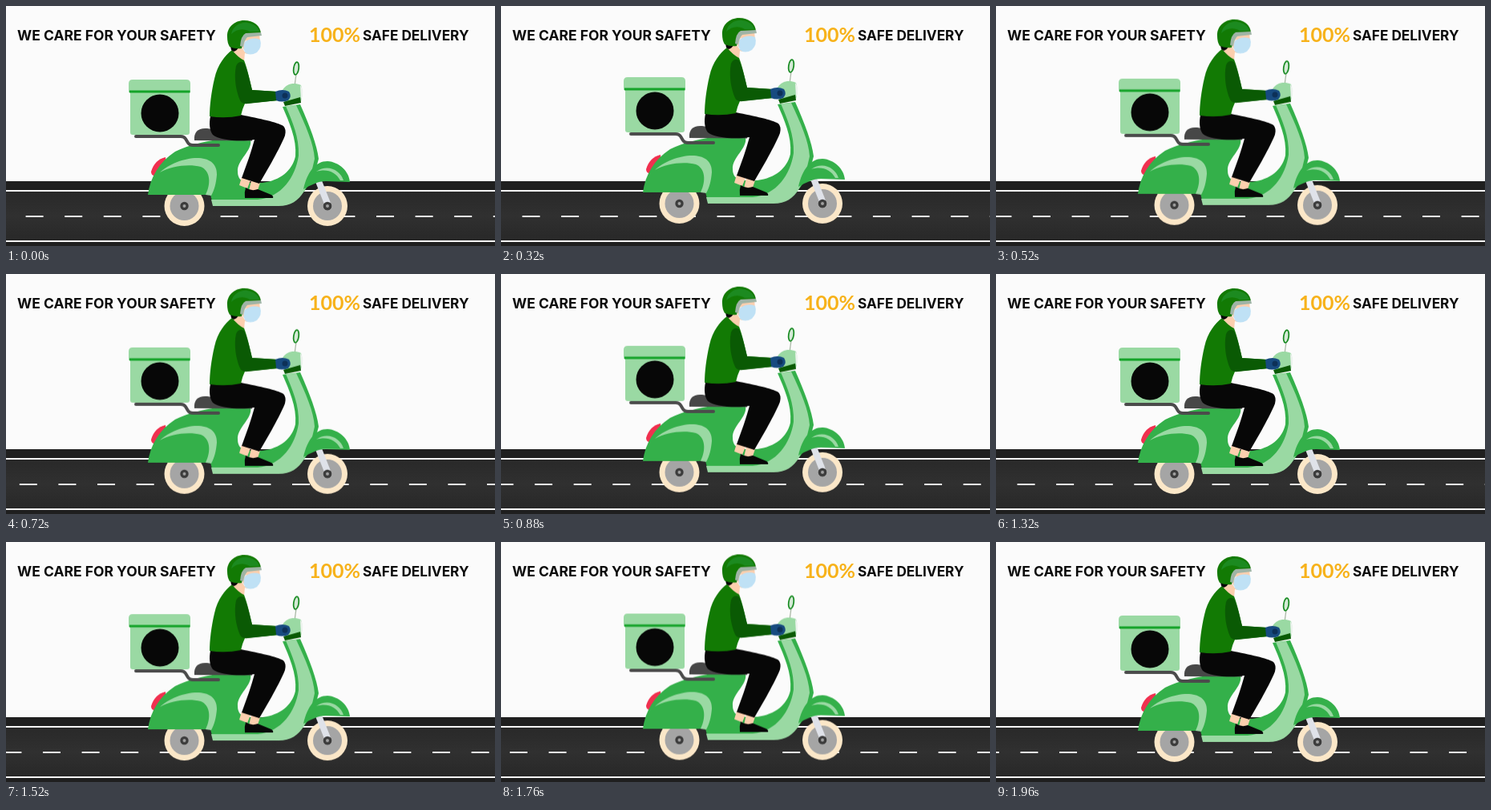
Animation of 610 by 300 pixels, one loop 2 s. Source, as an HTML page:

```html
<!DOCTYPE html>
<html lang="en">
<head>
<meta charset="utf-8">
<title>Safe delivery</title>
<style>
  html, body { margin: 0; width: 100%; height: 100%; overflow: hidden; background: #fbfbfb; }
  svg { display: block; width: 610px; height: 300px; }

  .slogan { font: 700 17.5px Inter, "Open Sans", sans-serif; fill: #0b0b0b; }
  .promise { font-size: 17.2px; }
  .percent { font: 700 25px Lato, sans-serif; fill: #f7b21a; }

  .green { fill: #34b04a; }
  .pale { fill: #9ad9a3; }
  .leaf { fill: #127a04; }
  .deep { fill: #0a5a04; }
  .black { fill: #070707; }
  .skin { fill: #fccfae; }

  /* Six dash spacings pass in one loop, at 25 pictures a second. */
  .dash {
    stroke: #f2f2f2; stroke-width: 2.2; stroke-dasharray: 22 26.6;
    animation: drive 2s steps(50) infinite;
  }
  @keyframes drive {
    from { stroke-dashoffset: 24px; }
    to { stroke-dashoffset: 315.6px; }
  }

  .ride { animation: bob 333.333ms cubic-bezier(.37, 0, .63, 1) infinite alternate; }
  @keyframes bob {
    from { transform: translateY(0); }
    to { transform: translateY(-3.1px); }
  }
</style>
</head>
<body>
<svg viewBox="0 0 610 300">
  <defs>
    <linearGradient id="asphalt" x2="0" y2="1">
      <stop offset="0" stop-color="#292929"/>
      <stop offset=".5" stop-color="#303030"/>
      <stop offset="1" stop-color="#282828"/>
    </linearGradient>
    <g id="wheel">
      <circle r="25" fill="#fbe7c8"/>
      <circle r="18" fill="#a5a5a5"/>
      <circle r="5.2" fill="#3c3c3c"/>
      <circle r="2" fill="#a0a0a0"/>
    </g>
  </defs>

  <rect width="610" height="300" fill="#fbfbfb"/>

  <text class="slogan" x="14" y="43">WE CARE FOR YOUR SAFETY</text>
  <text class="percent" x="378" y="45">100%</text>
  <text class="slogan promise" x="445" y="43">SAFE DELIVERY</text>

  <g id="road">
    <rect y="219" width="610" height="81" fill="#1f1f1f"/>
    <rect y="232" width="610" height="61" fill="url(#asphalt)"/>
    <path d="M0 231H610M0 294H610" stroke="#f4f4f4" stroke-width="2"/>
    <path class="dash" d="M0 263H610"/>
  </g>

  <g class="ride">
    <use href="#wheel" x="222.5" y="250"/>
    <use href="#wheel" x="401" y="250"/>

    <!-- tail light, rear body and floor -->
    <path fill="#f0304f" d="M199 189C190 191 184 197 181 207Q181 213 187 212L200 201Z"/>
    <path class="green" d="M177 236C180 214 191 195 211 182C227 174 245 170 263 167L305 167
      C308 181 288 192 289 207Q289 219 301 221L320 221C342 218 357 206 361 188
      C363 166 353 145 345 126L367 123C379 150 388 174 390 191C382 222 370 245 340 247
      L258 247L255 236Z"/>

    <!-- leg shield light band, running into the floor edge -->
    <path class="pale" d="M349 125L362 124C374 150 384 172 385 191C378 222 371 250 340 250
      H258L256 242H314C344 239 361 214 365 187C366 164 357 144 349 125Z"/>

    <!-- light band over the rear wheel -->
    <path class="pale" d="M192 208C211 189 264 178 263 211C262 222 260 230 256 237L249 236
      C256 222 255 206 243 201C228 197 206 200 192 208Z"/>

    <!-- front fork and mudguard -->
    <path d="M390 219L401 247" stroke="#dfe2e9" stroke-width="8"/>
    <circle cx="401" cy="250" r="5.2" fill="#3c3c3c"/>
    <circle cx="401" cy="250" r="2" fill="#a0a0a0"/>
    <path class="green" d="M371 229C376 207 386 194 401 194C416 195 428 207 429 220
      L399 219C389 219 380 224 371 229Z"/>
    <path class="pale" d="M387 207C401 197 417 205 421 218L417 218C411 207 400 203 387 207Z"/>

    <!-- seat and rack -->
    <path fill="#474747" d="M235 168C234 157 240 152 251 153L302 162Q308 165 307 168.5Z"/>
    <path d="M162 163H218Q222 163 224 166L227 171Q229 174 233 174H265"
      fill="none" stroke="#4b4b4b" stroke-width="4" stroke-linecap="round"/>

    <!-- box -->
    <path class="pale" d="M155 108H229V158Q229 161 226 161H158Q155 161 155 158Z"/>
    <path class="pale" d="M153 108V97Q153 92 158 92H225Q230 92 230 97V108Z"/>
    <path fill="#15a329" d="M154 105.5H229.5V108.5H154Z"/>
    <circle class="black" cx="192" cy="134" r="23.5"/>

    <!-- legs -->
    <path class="skin" d="M294 214L305 218L301 228L291 224ZM306 218L317 221L313 233L303 231Z"/>
    <path class="black" d="M299 227Q306 232 314 229L331 236Q334 238 333 240H298Q297 233 299 227Z"/>
    <path class="black" d="M255 138L293 136C317 141 338 145 346 150Q350 154 348 162
      C344 172 337 185 331 196L316 222L294 215L303 190C306 181 308 174 310 167
      C293 170 266 168 258 161C254 156 253 147 255 138Z"/>

    <!-- handlebar and mirror -->
    <path d="M360 100L362 85" stroke="#a9b8a5" stroke-width="1.3"/>
    <ellipse cx="362" cy="78" rx="3.2" ry="8" transform="rotate(8 362 78)"
      fill="#d4ead6" stroke="#168a20" stroke-width="1.7"/>
    <path class="pale" d="M345 105C350 97 359 95 368 99Q371 108 368 119L348 124Z"/>
    <path fill="#eef3ef" d="M367 99Q373 106 368 117Z"/>
    <path class="deep" d="M346 120L367 114L368 121L348 125Z"/>

    <!-- neck and jacket -->
    <path class="skin" d="M284 48H299L297 69L282 60Z"/>
    <path class="leaf" d="M282 55C273 62 264 73 260 91C256 108 254 125 254 138
      Q274 141 293 137Q295 128 298 122L339 118L338 107L307 105C304 92 301 78 297 68
      Q289 64 282 55Z"/>
    <path class="deep" d="M287 75C284 89 287 107 292 118Q294 123 302 122L339 118L338 107
      L307 105C304 92 301 80 297 71Q290 68 287 75Z"/>
    <path class="black" d="M280 50L290 52Q288 56 284 57L281 55Z"/>
    <path fill="#174b80" d="M336 107Q345 103 353 107Q357 113 352 118Q344 121 337 118Z"/>
    <circle cx="348" cy="112" r="3.5" fill="#0d3158"/>

    <!-- head -->
    <path class="skin" d="M294 34H316L317 46L312 56Q304 62 298 59L290 51Z"/>
    <path fill="#bfe1f5" d="M298 45Q307 38 317 42Q320 51 313 58Q304 63 298 58
      Q295 51 298 45Z"/>
    <path d="M295 47L300 43M294 51L298 57" stroke="#e6f3fa" stroke-width="1"/>
    <path class="leaf" d="M276 39C275 27 285 18 297 18C309 18 318 25 318 35L300 36
      Q296 42 294 53Q286 54 279 51Q276 46 276 39Z"/>
    <path fill="#1c8a20" d="M281 35C283 25 292 20 301 21C309 22 315 27 316 32L304 32
      C296 27 287 29 281 35Z"/>
    <path fill="#9fb4a6" d="M318 33L319 37L301 39Q297 43 296 51L292 50Q293 37 299 34Z"/>
  </g>
</svg>
</body>
</html>
```
